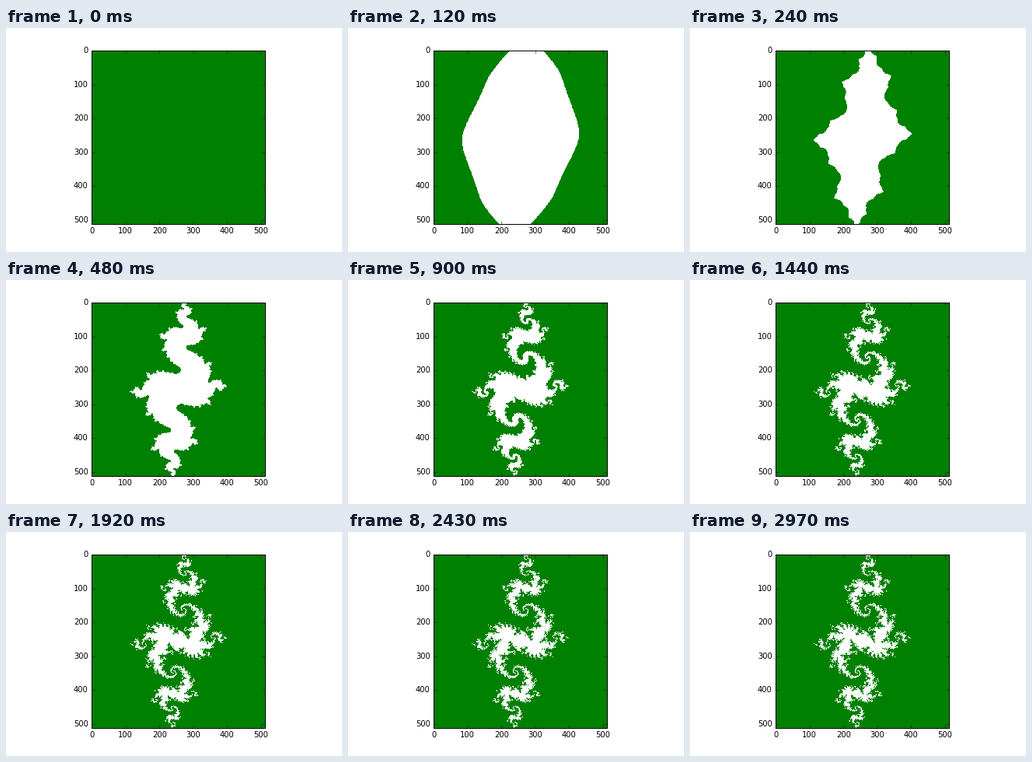
A matplotlib script for the animation above (3000 ms loop, 432 px wide and 288 px high).

```python
import numpy as np
import matplotlib.pyplot as plt
from matplotlib.animation import FuncAnimation
from matplotlib.colors import ListedColormap

FRAMES, INTERVAL = 100, 30
SIZE, SPAN = 512, 1.5
C = -0.82 + 0.18j
LIMIT = 1000

plt.rcParams.update({
    "font.family": "DejaVu Sans",
    "font.size": 10,
    "savefig.dpi": 72,
    "axes.linewidth": 1.0,
    "ytick.alignment": "center",
    "text.kerning_factor": 6,
})


def escape_steps(count):
    """Number of iterations each start point stays below the limit."""
    axis = np.linspace(-SPAN, SPAN, SIZE)
    z = axis[:, None] + 1j * axis[None, :]  # real part runs down the rows
    steps = np.full(z.shape, count)
    alive = np.ones(z.shape, bool)
    for n in range(count):
        z[alive] = z[alive] ** 2 + C
        out = alive & (np.abs(z) > LIMIT)
        steps[out] = n
        alive &= ~out
    return steps


steps = escape_steps(FRAMES)


def julia(frame):
    inside = steps > frame
    # A uniform field takes the lowest colour.
    return np.zeros(inside.shape) if inside.all() else inside.astype(float)


fig = plt.figure(figsize=(6, 4), dpi=72, facecolor="white")
fig.subplots_adjust(left=0.125, right=0.9, bottom=0.125, top=0.9)
ax = fig.add_subplot()
image = ax.imshow(julia(0), cmap=ListedColormap(["green", "white"]),
                  vmin=0, vmax=1, interpolation="nearest")
ax.set_xticks(range(0, 501, 100))
ax.set_yticks(range(0, 501, 100))
ax.tick_params(direction="in", top=True, right=True,
               length=4, width=0.5, pad=4)


def update(frame):
    image.set_data(julia(frame))
    return image,


anim = FuncAnimation(fig, update, frames=FRAMES, interval=INTERVAL,
                     repeat=True, repeat_delay=0)
plt.show()
```
